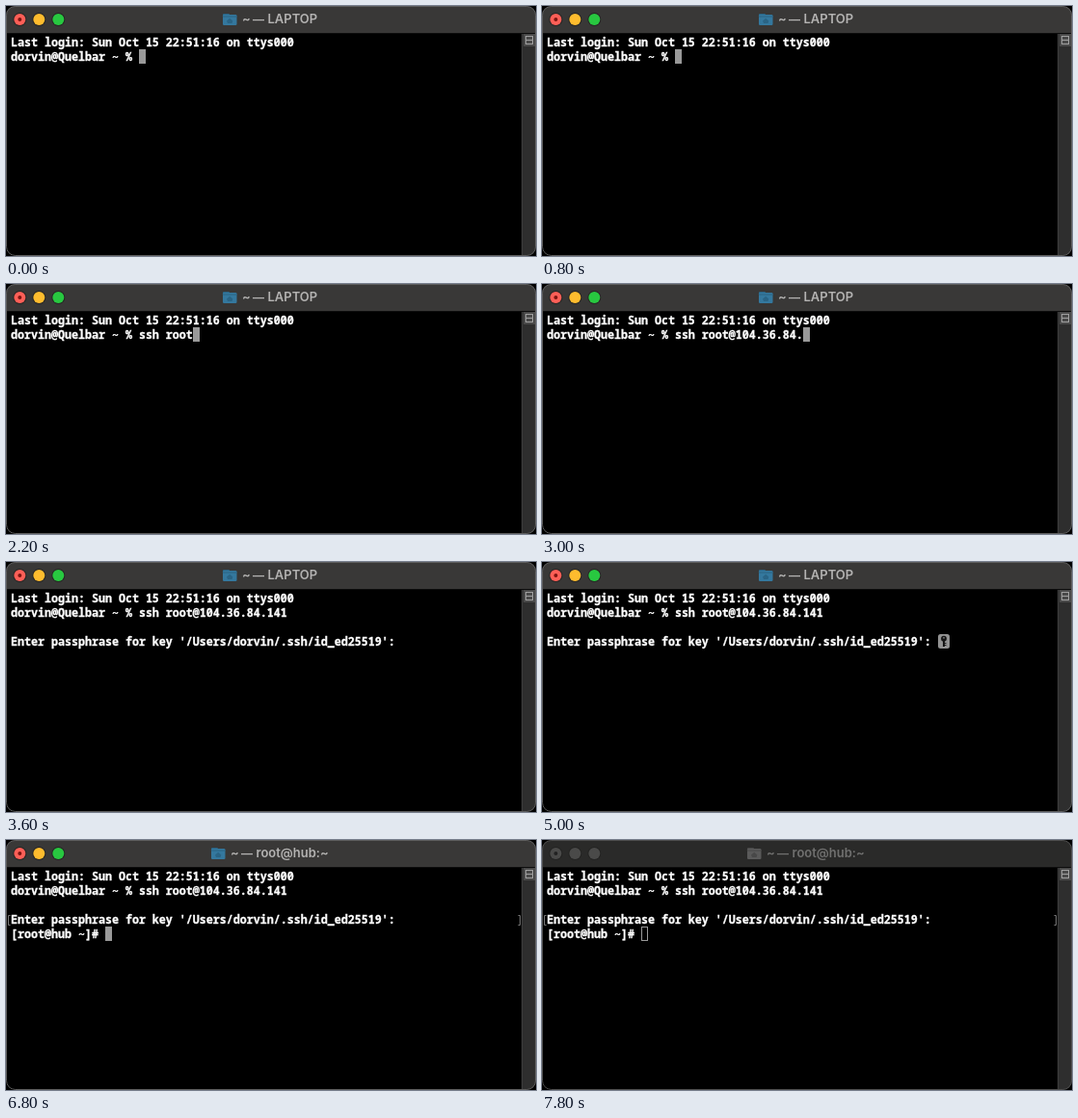
Recreate the animation shown at these times as an HTML page with a canvas. Size 550 by 260 pixels, loop 8 s.

```html
<!DOCTYPE html>
<html lang="en">
<head>
<meta charset="utf-8">
<title>Terminal login</title>
<style>
html, body { margin: 0; width: 100%; height: 100%; overflow: hidden; background: #000; }
canvas { display: block; width: 550px; height: 260px; }
</style>
</head>
<body>
<canvas id="stage" width="550" height="260"></canvas>
<script>
const ctx = document.getElementById('stage').getContext('2d');
const LOOP = 8000, STEP = 200;
const CELL = 7, LINE = 15, LEFT = 5, BASE = 42;
const MONO = '700 11.667px "Noto Sans Mono", "DejaVu Sans Mono", monospace';
const SANS = '600 13px Inter, "Open Sans", sans-serif';
const DASH = '700 12px "Liberation Sans", sans-serif';

const USER = 'dorvin';
const PROMPT = USER + '@Quelbar ~ % ';
const COMMAND = 'ssh root@104.36.84.141';
const ASK = `Enter passphrase for key '/Users/${USER}/.ssh/id_ed25519': `;
const REMOTE = '[root@hub ~]# ';

// Time in ms and number of command characters typed by then
const TYPING = [[1000, 1], [1200, 2], [1400, 3], [1600, 4], [1800, 5], [2000, 7],
  [2200, 8], [2400, 9], [2600, 12], [2800, 15], [3000, 19], [3200, 22]];
const ENTER = 3400, KEY = 3800, LOGIN = 6200, BLUR = 7600;

function rect(x, y, w, h, color) {
  ctx.fillStyle = color;
  ctx.fillRect(x, y, w, h);
}

function roundBox(x, y, w, h, r, color) {
  ctx.fillStyle = color;
  ctx.beginPath();
  ctx.roundRect(x, y, w, h, r);
  ctx.fill();
}

function outline(x, y, w, h, color) {
  ctx.strokeStyle = color;
  ctx.lineWidth = 1;
  ctx.strokeRect(x + 0.5, y + 0.5, w - 1, h - 1);
}

function disc(x, y, r, color) {
  ctx.fillStyle = color;
  ctx.beginPath();
  ctx.arc(x, y, r, 0, Math.PI * 2);
  ctx.fill();
}

function text(str, x, y, font, color) {
  ctx.font = font;
  ctx.fillStyle = color;
  ctx.fillText(str, x, y);
}

function row(str, n) {
  const y = BASE + n * LINE;
  text(str, LEFT, y, MONO, '#fff');
  ctx.strokeStyle = '#fff';
  ctx.lineWidth = 0.3;
  ctx.strokeText(str, LEFT, y);
}

function cursor(col, n, hollow) {
  const x = LEFT + col * CELL, y = BASE + n * LINE - 12;
  if (hollow) outline(x, y, CELL, LINE, '#999');
  else rect(x, y, CELL, LINE, '#999');
}

function keyCursor(col, n) {
  const x = LEFT + col * CELL, y = BASE + n * LINE - 12;
  roundBox(x, y, 12, 15, 2.5, '#929292');
  disc(x + 6, y + 4.7, 2.9, '#151515');
  rect(x + 5, y + 6, 2, 7, '#151515');
  rect(x + 7, y + 9, 1.5, 1, '#151515');
  rect(x + 7, y + 11, 1.5, 1, '#151515');
  disc(x + 6, y + 3.9, 0.8, '#929292');
}

function folder(x, active) {
  const dark = active ? '#2a6485' : '#484848';
  roundBox(x, 8, 7, 5, 1, dark);
  roundBox(x, 9, 14.5, 11, 1.2, active ? '#34789e' : '#5a5a5a');
  rect(x, 10.5, 14.5, 1, dark);
  ctx.fillStyle = dark;
  ctx.beginPath();
  ctx.moveTo(x + 4, 15.5);
  ctx.lineTo(x + 7.2, 12.8);
  ctx.lineTo(x + 10.4, 15.5);
  ctx.lineTo(x + 9.5, 18);
  ctx.lineTo(x + 5, 18);
  ctx.fill();
}

function titleBar(name, x, active) {
  rect(0, 0, 550, 28, active ? '#393837' : '#2a2a29');
  rect(0, 28, 550, 1, '#0c0c0c');
  const colors = active ? ['#ff5f57', '#febc2e', '#28c840'] : Array(3).fill('#4a4a49');
  colors.forEach((color, i) => {
    const cx = 14.3 + i * 20;
    disc(cx, 14, 7, active ? '#262524' : '#232322');
    disc(cx, 14, 6, color);
  });
  disc(14.3, 14, 2, active ? '#7d1612' : '#222');
  folder(x, active);
  const color = active ? '#b4b3b2' : '#70706f';
  text('~', x + 20, 18, SANS, color);
  text('—', x + 31, 18, DASH, color);
  text(name, x + 46.5, 18, SANS, color);
}

function scrollbar() {
  rect(535, 29, 15, 231, '#2e2e2e');
  rect(535, 29, 1, 231, '#3d3d3d');
  rect(537, 29, 12, 13, '#4a4a4a');
  outline(539, 31, 8, 9, '#a0a0a0');
  rect(540, 35, 6, 1, '#a0a0a0');
}

function bracket(x, dir) {
  const y = 78.5;
  ctx.strokeStyle = '#777';
  ctx.lineWidth = 1;
  ctx.beginPath();
  ctx.moveTo(x + 2 * dir, y);
  ctx.lineTo(x, y);
  ctx.lineTo(x, y + 10);
  ctx.lineTo(x + 2 * dir, y + 10);
  ctx.stroke();
}

function windowFrame(title, x, active) {
  ctx.save();
  ctx.beginPath();
  ctx.roundRect(0, 0, 550, 260, 9);
  ctx.clip();
  titleBar(title, x, active);
  scrollbar();
  ctx.strokeStyle = active ? '#5c5c5c' : '#4c4c4c';
  ctx.lineWidth = 1;
  ctx.beginPath();
  ctx.roundRect(0.5, 0.5, 549, 259, 9);
  ctx.stroke();
  ctx.restore();
}

function draw(t) {
  const active = t < BLUR, remote = t >= LOGIN;
  const typed = TYPING.reduce((n, [at, count]) => t >= at ? count : n, 0);

  rect(0, 0, 550, 260, '#000');
  windowFrame(remote ? 'root@hub:~' : 'LAPTOP', remote ? 213 : 225, active);

  row('Last login: Sun Oct 15 22:51:16 on ttys000', 0);
  row(PROMPT + COMMAND.slice(0, typed), 1);
  if (t < ENTER) {
    cursor(PROMPT.length + typed, 1);
    return;
  }
  row(ASK, 3);
  if (remote) {
    bracket(2.5, 1);
    bracket(533.5, -1);
    row(REMOTE, 4);
    cursor(REMOTE.length, 4, !active);
  } else if (t >= KEY) {
    keyCursor(ASK.length, 3);
  }
}

const start = performance.now();
function tick() {
  const t = (performance.now() - start) % LOOP;
  draw(Math.floor(t / STEP) * STEP);
  requestAnimationFrame(tick);
}
tick();
</script>
</body>
</html>
```
